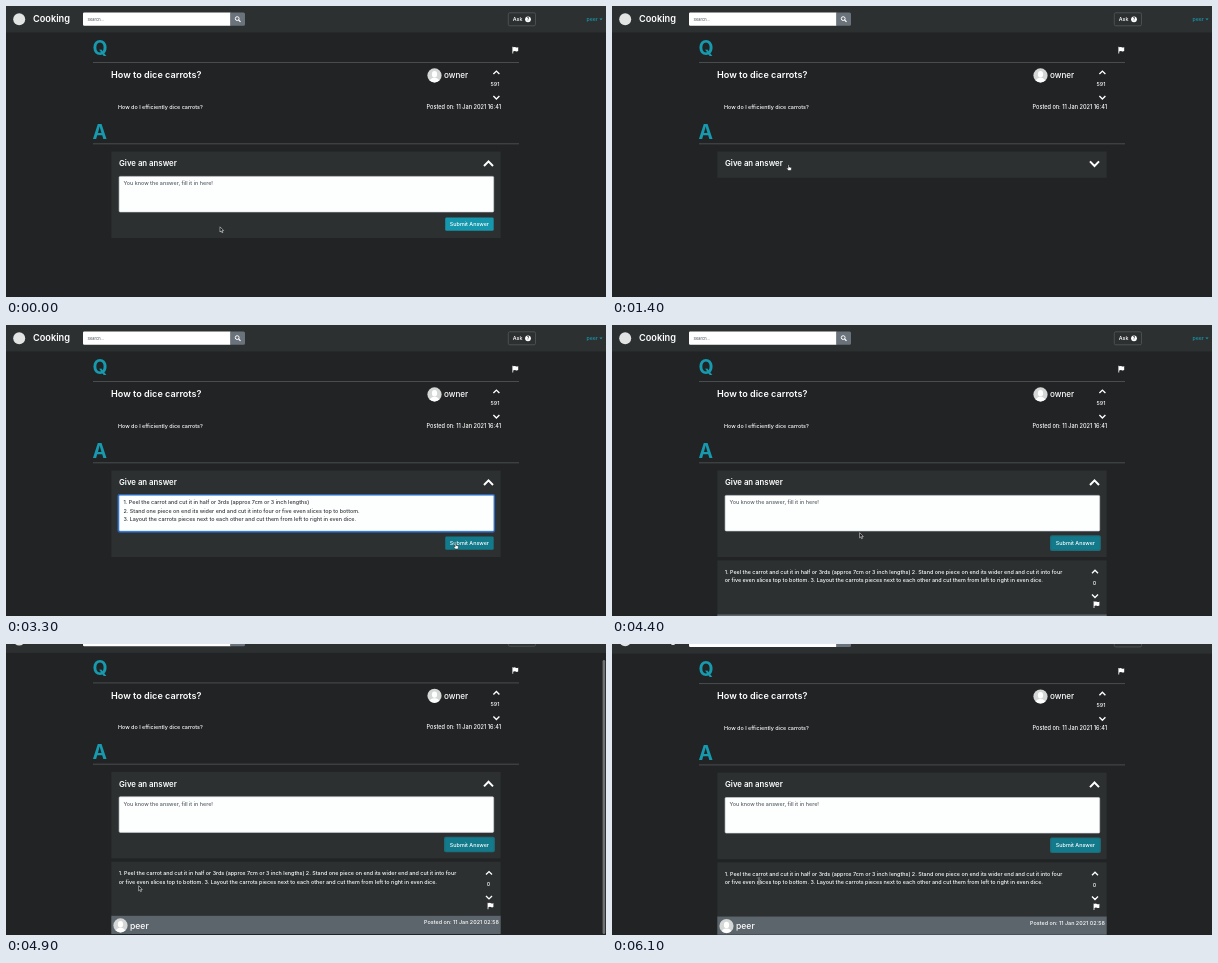
Recreate the animation shown at these times as an HTML page. Size 600x291 px, loop 7.4 s.

```html
<!DOCTYPE html>
<html lang="en">
<head>
<meta charset="utf-8">
<title>Cooking Q&amp;A</title>
<style>
  html, body { margin: 0; width: 100%; height: 100%; overflow: hidden; background: #212324; }
  svg { display: block; width: 100%; height: 100%; font: 500 5.42px Inter, "Open Sans", sans-serif; }
  text { fill: #fff; white-space: pre; }
  .teal { fill: #1799ae; }
  .bold { font-weight: 600; }
  .end { text-anchor: end; }
  .center { text-anchor: middle; }
  .letter { font-size: 19.4px; font-weight: 700; }
  .grey { fill: #596067; }
  .ink { fill: #33383c; }
  .chev { fill: none; stroke: #fff; }
  .rule { stroke: #53585a; stroke-width: .8; }
  .panel { fill: #2c3031; }
</style>
</head>
<body>
<svg viewBox="0 0 600 291" xmlns="http://www.w3.org/2000/svg">
  <defs>
    <clipPath id="bodyClip"><rect id="bodyBox" x="100" y="169" width="400" height="62"/></clipPath>
    <clipPath id="round"><circle r="7"/></clipPath>
    <g id="avatar">
      <circle r="7.1" fill="#d5d7d7"/>
      <g clip-path="url(#round)" fill="#fff"><ellipse cy="-1.2" rx="2.6" ry="3.2"/><ellipse cy="6.2" rx="5" ry="3.8"/></g>
    </g>
    <path id="flag" d="M-2.8-3.2h.8v.5q1.3-.7 2.6 0t2.4-.2v4q-1.3.7-2.5.1t-2.5.2v2h-.8z" fill="#fff"/>
    <path id="up" class="chev" d="M-3 1.5 0-1.5 3 1.5" stroke-width="1.35"/>
    <path id="down" class="chev" d="M-3-1.5 0 1.5 3-1.5" stroke-width="1.35"/>
    <path id="beam" d="M-1.3-3Q0-3 0-2.3V2.3Q0 3-1.3 3M1.3-3Q0-3 0-2.3M0 2.3Q0 3 1.3 3"/>
  </defs>
  <rect width="600" height="291" fill="#212324"/>
  <g id="page">
    <rect class="panel" width="600" height="26.5"/>
    <circle cx="13.2" cy="13.2" r="6" fill="#e2e3e3"/>
    <text class="bold" x="27" y="16" font-size="9.2">Cooking</text>
    <path d="M78.2 6.6H224.5V19.8H78.2a1.2 1.2 0 0 1-1.2-1.2V7.8a1.2 1.2 0 0 1 1.2-1.2z" fill="#fff"/>
    <text class="grey" x="81.5" y="15" font-size="3.9">Search...</text>
    <path d="M224.5 6.6h13a1.5 1.5 0 0 1 1.5 1.5v10.2a1.5 1.5 0 0 1-1.5 1.5h-13z" fill="#6a737b"/>
    <g fill="none" stroke="#fff"><circle cx="231.2" cy="12.6" r="1.9"/><path d="m232.6 14 1.9 1.9" stroke-width="1.2"/></g>
    <rect x="502.3" y="6.8" width="27.2" height="13" rx="1.5" fill="none" stroke="#575c5f" stroke-width=".7"/>
    <text x="506.8" y="15.3">Ask</text>
    <circle cx="522" cy="13.3" r="2.9" fill="#fff"/>
    <text class="center bold ink" x="522" y="15.1" font-size="4.8">?</text>
    <text class="teal" x="580.5" y="15.2" font-size="5.2">peer</text>
    <path class="teal" d="M593.4 12.6h3.2l-1.6 1.7z"/>

    <text class="letter teal" x="86.4" y="48.8">Q</text>
    <use href="#flag" x="509.2" y="44"/>
    <path class="rule" d="M87 56.5H513M87 137.8H513"/>
    <text class="bold" x="105" y="72.2" font-size="9.1">How to dice carrots?</text>
    <use href="#avatar" x="428.5" y="69.4"/>
    <text x="438" y="72.2" font-size="8.1">owner</text>
    <use href="#up" x="490.4" y="66.6"/>
    <text class="center" x="489" y="80.1">591</text>
    <use href="#down" x="490.4" y="91.6"/>
    <text x="112" y="103">How do I efficiently dice carrots?</text>
    <text class="end" x="495" y="103" font-size="5.55">Posted on: 11 Jan 2021 16:41</text>
    <text class="letter teal" x="86.6" y="132.7">A</text>

    <rect id="card" class="panel" x="105.3" y="145.5" width="389.4" height="86.5"/>
    <text class="bold" x="113" y="160.4" font-size="7.8">Give an answer</text>
    <path id="toggle" class="chev" stroke-width="2"/>
    <g id="form" clip-path="url(#bodyClip)">
      <rect id="ring" x="112.3" y="169.5" width="375.9" height="37.3" rx="1.8" fill="none" stroke="#2b5fae" stroke-width="1.8"/>
      <rect id="field" x="113.1" y="170.4" width="374.6" height="35.6" rx="1.1" fill="#fdfefe" stroke-width=".6"/>
      <text id="hint" class="grey" x="117.5" y="179.2">You know the answer, fill it in here!</text>
      <path id="caret" d="M117.4 174v6.4" stroke="#222" stroke-width=".5"/>
      <g id="draft"></g>
      <rect id="halo" x="438" y="210.3" width="50.9" height="15.6" rx="2" fill="#1d6b79"/>
      <rect id="send" x="439.2" y="211.5" width="48.5" height="13.3" rx="1.4"/>
      <text class="center" x="463.4" y="220.2" font-size="5.4">Submit Answer</text>
    </g>

    <g id="reply">
      <rect class="panel" x="105.3" y="235.3" width="389.4" height="54.2"/>
      <text x="112.7" y="248.8">1. Peel the carrot and cut it in half or 3rds (approx 7cm or 3 inch lengths) 2. Stand one piece on end its wider end and cut it into four</text>
      <text x="112.7" y="257.2">or five even slices top to bottom. 3. Layout the carrots pieces next to each other and cut them from left to right in even dice.</text>
      <use href="#up" x="483" y="246.7"/>
      <text class="center" x="482.6" y="259.6">0</text>
      <use href="#down" x="483" y="271"/>
      <use href="#flag" x="484.4" y="279.5"/>
      <rect x="105.3" y="289.4" width="389.4" height="18.2" fill="#5d656c"/>
      <use href="#avatar" x="114.5" y="299"/>
      <text x="124" y="302.3" font-size="8.6">peer</text>
      <text class="end" x="492.8" y="297.8">Posted on: 11 Jan 2021 02:58</text>
    </g>
  </g>
  <rect id="bar" x="596.6" y="16" width="2.6" height="274" rx="1.3" fill="#7d8080"/>
  <g id="cursor">
    <path id="arrow" d="M0 0V5.2L1.2 4.1 2 6 2.9 5.6 2.1 3.8H3.7z" fill="#111" stroke="#fff" stroke-width=".5"/>
    <g id="ibeam" fill="none">
      <use href="#beam" stroke="#fff" stroke-width="1.2" opacity=".7"/>
      <use href="#beam" stroke="#222" stroke-width=".6"/>
    </g>
    <path id="hand" d="M-.9-2.4q.5-.9 1 0V-.6L2 0q.6.2.5.9L2.1 3H-.7L-2.3.9q-.2-.8.6-.5l.8.5z" fill="#fff" stroke="#111" stroke-width=".45"/>
  </g>
</svg>
<script>
const LOOP = 7400, STEP = 100;
const $ = id => document.getElementById(id);
const set = (id, name, value) => $(id).setAttribute(name, value);
const show = (id, on) => set(id, "display", on ? "inline" : "none");

const steps = [
  "1. Peel the carrot and cut it in half or 3rds (approx 7cm or 3 inch lengths)",
  "2. Stand one piece on end its wider end and cut it into four or five even slices top to bottom.",
  "3. Layout the carrots pieces next to each other and cut them from left to right in even dice."
];
$("draft").innerHTML = steps.map((s, i) =>
  `<text class="ink" x="117.5" y="${179.2 + i * 8.6}">${s}</text>`).join("");

// time, x, y, pointer shape
const path = [
  [0, 214, 220.8, "arrow"], [300, 190, 196, "ibeam"], [700, 178, 178, "ibeam"], [800, 178, 178, "ibeam"],
  [1000, 177, 161.5, "hand"], [1700, 177, 161.5, "hand"], [2000, 174, 165, "hand"],
  [2100, 165, 178, "ibeam"], [2400, 149.3, 184.5, "ibeam"], [2500, 149, 185, "ibeam"], [2600, 149, 185, "ibeam"],
  [2900, 330, 203, "ibeam"], [3000, 390, 212, "arrow"], [3100, 442, 219, "hand"], [3300, 450, 221, "hand"],
  [3500, 450, 221, "hand"], [3600, 430, 219, "arrow"], [4200, 251, 208, "arrow"], [4400, 247.6, 207.7, "arrow"],
  [4900, 132.6, 241.7, "arrow"], [5000, 132.6, 241.7, "arrow"], [5800, 199.5, 251.5, "arrow"],
  [6000, 158, 240, "ibeam"], [6100, 147, 237, "ibeam"]
];

const ease = p => p * p * (3 - 2 * p);
const ramp = (t, a, b) => ease(Math.min(1, Math.max(0, (t - a) / (b - a))));
const within = (t, a, b) => t >= a && t < b;

function pointer(t) {
  const i = path.findLastIndex(k => k[0] <= t);
  const a = path[i], b = path[i + 1] || a;
  const p = a === b ? 0 : (t - a[0]) / (b[0] - a[0]);
  return [a[1] + (b[1] - a[1]) * p, a[2] + (b[2] - a[2]) * p, a[3]];
}

function draw(t) {
  const open = 1 - ramp(t, 1000, 1350) + ramp(t, 1800, 2150);
  set("card", "height", 26.3 + 60.2 * open);
  set("bodyBox", "height", 2.8 + 60.2 * open);
  show("form", open > 0.01);
  const closed = within(t, 1100, 1900);
  set("toggle", "d", closed ? "M478 155.4 482.5 160 487 155.4" : "M478 160 482.5 155.4 487 160");

  const focus = within(t, 500, 1000) || within(t, 2300, 3500);
  const filled = within(t, 2700, 3500);
  const sent = t >= 3500;
  show("ring", focus);
  set("field", "stroke", focus ? "#80bdff" : "#ced4da");
  show("hint", !filled);
  show("caret", focus && !filled);
  show("draft", filled);
  show("halo", sent);
  set("send", "fill", t >= 3100 ? "#127a8b" : "#1597ad");
  show("reply", sent);

  const scroll = 17.6 * ramp(t, 4400, 4800) - 0.7 * ramp(t, 5050, 5500);
  set("page", "transform", `translate(0 ${-scroll})`);
  set("bar", "opacity", 0.85 * ramp(t, 4400, 4600) * (1 - ramp(t, 5400, 5800)));

  const [x, y, shape] = pointer(t);
  set("cursor", "transform", `translate(${x} ${y})`);
  for (const id of ["arrow", "ibeam", "hand"]) show(id, id === shape);
}

const start = performance.now();
function tick() {
  const t = (performance.now() - start) % LOOP;
  draw(Math.floor(t / STEP) * STEP);
  requestAnimationFrame(tick);
}
tick();
</script>
</body>
</html>
```
